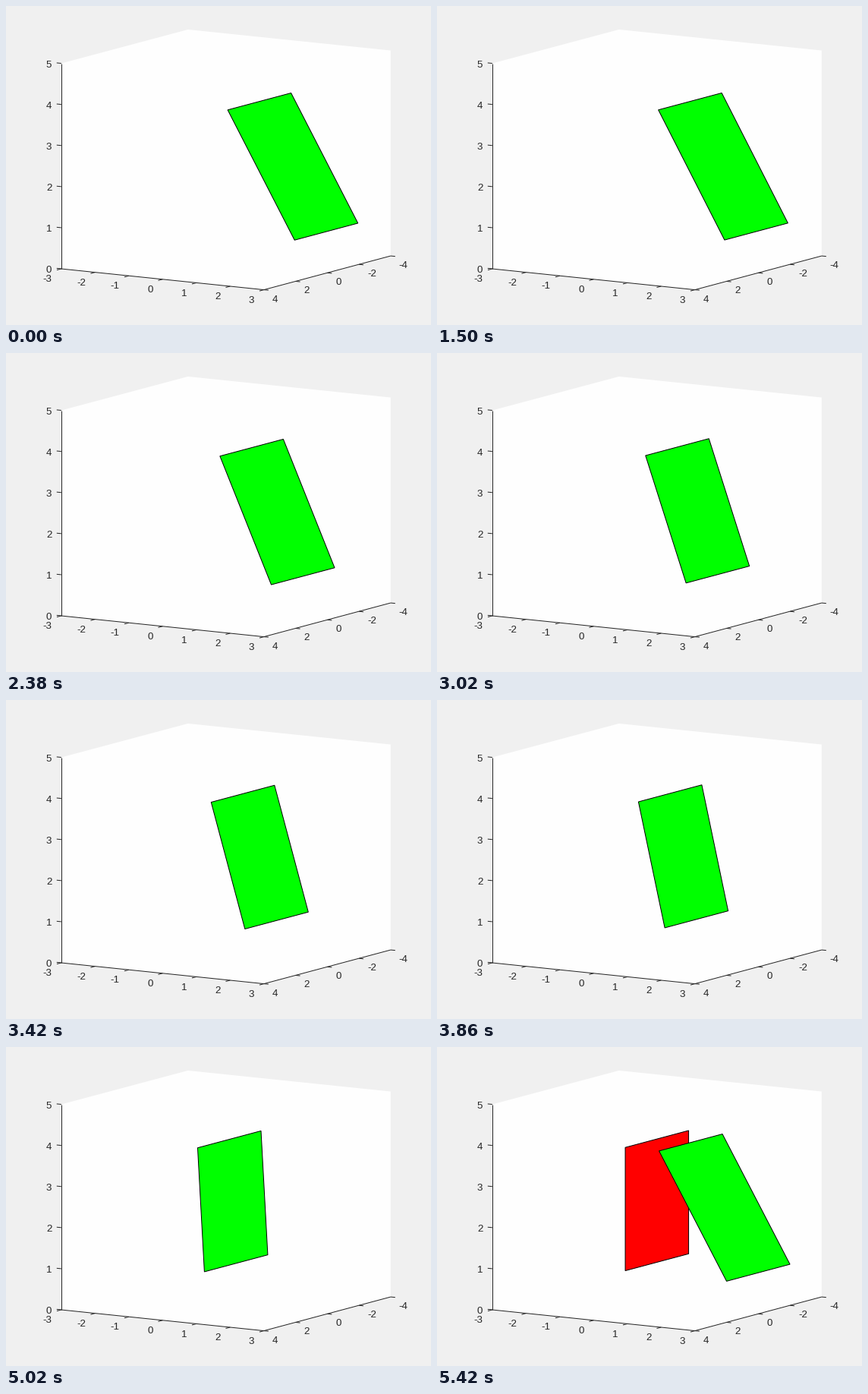
Write a matplotlib script that moves like this. It is 560 by 420 pixels and loops after 6920 ms.

```python
import matplotlib.pyplot as plt
from matplotlib.animation import FuncAnimation
from matplotlib.patches import Polygon

W, H, DPI = 560, 420, 100
PX = 72 / DPI                # one pixel in points
INK = (38 / 255,) * 3
TICK_MS = 20
LOOP_MS = 6920
HOLD_MS, STEP_MS, STEPS = 1500, 40, 100


def project(x, y, z):
    """Map box coordinates to pixels (orthographic view)."""
    dx, dy = x + 3, 4 - y
    return (72.8 + 44.5 * dx + 20.875 * dy,
            346 + 4.6 * dx - 5.57 * dy - 54.1 * z)


def sheet(top, bottom):
    """Corners of a sheet hung from x=top at z=4 down to x=bottom at z=1."""
    return [project(top, 2, 4), project(top, -2, 4),
            project(bottom, -2, 1), project(bottom, 2, 1)]


plt.rcParams["font.family"] = "Liberation Sans"
fig = plt.figure(figsize=(W / DPI, H / DPI), dpi=DPI, facecolor="#f0f0f0")
ax = fig.add_axes([0, 0, 1, 1])
ax.set_xlim(0, W)
ax.set_ylim(H, 0)
ax.axis("off")


def line(a, b):
    ax.plot([a[0], b[0]], [a[1], b[1]], color=INK, lw=PX,
            solid_capstyle="butt")


def tick(point, step, offset, text, align):
    """Draw a tick mark and its label relative to a point on an axis."""
    x, y = point
    line(point, (x + step[0], y + step[1]))
    ax.text(x + offset[0], y + offset[1] + 4.6, text, color=INK,
            fontsize=13.33 * PX, ha=align, va="baseline")


# White box silhouette
ax.add_patch(Polygon([project(*c) for c in (
    (-3, 4, 0), (-3, 4, 5), (-3, -4, 5), (3, -4, 5), (3, -4, 0), (3, 4, 0))],
    fc="#fefefe", ec="none"))

# Axes with ticks
line(project(-3, 4, 0), project(3, 4, 0))
line(project(3, 4, 0), project(3, -4, 0))
line(project(-3, 4, 0), project(-3, 4, 5))
for v in range(-3, 4):
    tick(project(v, 4, 0), (-5.8, 1.55), (-12.5, 12.5), str(v), "right")
for v in range(-4, 5, 2):
    tick(project(3, v, 0), (6, 0.6), (11, 11.3), str(v), "left")
for v in range(6):
    tick(project(-3, 4, v), (-6, -0.6), (-12.5, 0.8), str(v), "right")

style = dict(ec="black", lw=PX, joinstyle="miter")
red = ax.add_patch(Polygon(sheet(0, 0), fc="#ff0000", zorder=3, **style))
green = ax.add_patch(Polygon(sheet(1, 3), fc="#00ff00", zorder=4, **style))


def update(i):
    t = i * TICK_MS
    step = 1 if t < HOLD_MS else (t - HOLD_MS) // STEP_MS + 2
    done = step >= STEPS
    left = 1 if done else 1 - step / STEPS
    red.set_visible(done)
    green.set_xy(sheet(left, 3 * left))
    return red, green


anim = FuncAnimation(fig, update, frames=LOOP_MS // TICK_MS,
                     init_func=lambda: update(0), interval=TICK_MS,
                     repeat=True)
plt.show()
```
